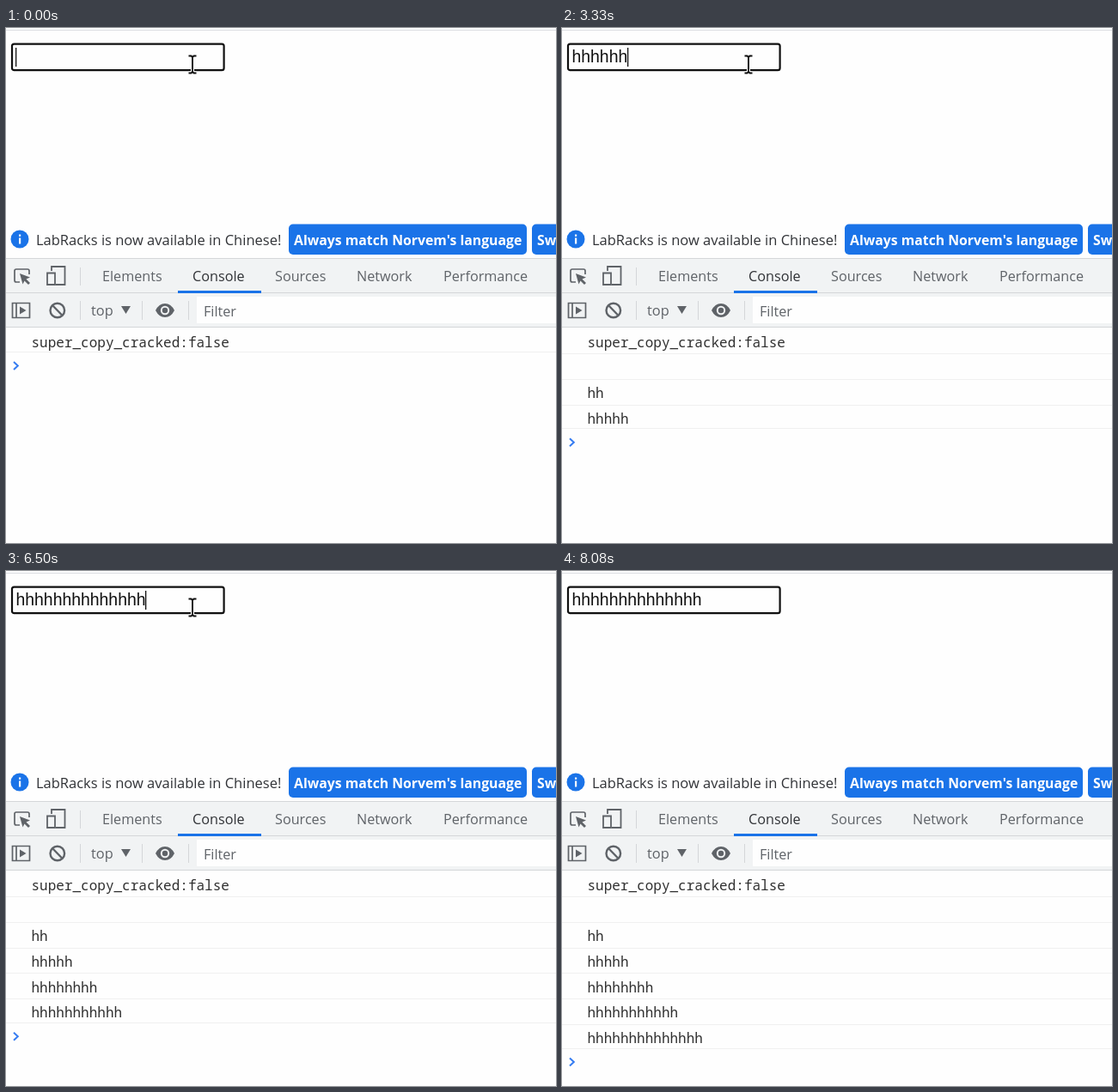
Recreate the animation shown at these times as an HTML page with a canvas. Size 640x600 px, loop 8580 ms.

```html
<!DOCTYPE html>
<html lang="en">
<head>
<meta charset="utf-8">
<title>Console typing</title>
<style>
html, body { margin: 0; width: 100%; height: 100%; overflow: hidden; background: #fefefe; }
canvas { display: block; width: 640px; height: 600px; }
</style>
</head>
<body>
<canvas id="stage"></canvas>
<script>
const LOOP = 8580;
const PAGE = '#fefefe', BAR = '#f1f3f4', EDGE = '#d4d6d9', ICON = '#5f6368';
const BLUE = '#1a73e8', HOVER = '#3b86ea';
const UI = '"Open Sans", "Noto Sans", sans-serif';
const MONO = '"Noto Sans Mono", "DejaVu Sans Mono", monospace';
const INPUT = '"Liberation Sans", Arial, sans-serif';

// Moments at which a letter is typed, and at which its text reaches the console.
const keys = [1000, 1580, 2080, 2500, 2920, 3330, 3830, 4170, 4580, 5000, 5420, 5830, 6080, 6500];
const logs = [[500, 0], [1830, 2], [3000, 5], [4330, 8], [5580, 11], [6580, 14]];
// Pointer stops after it leaves the input: [time, x, y].
const stops = [[7420, 262, 110], [7500, 350, 250], [7580, 428, 473], [7670, 484, 578]];

const canvas = document.getElementById('stage');
const ctx = canvas.getContext('2d');
const scale = window.devicePixelRatio || 1;
canvas.width = 640 * scale;
canvas.height = 600 * scale;

function rect(x, y, w, h, color) {
  ctx.fillStyle = color;
  ctx.fillRect(x, y, w, h);
}

function text(str, x, y, font, color) {
  ctx.font = font;
  ctx.fillStyle = color;
  ctx.fillText(str, x, y);
}

function stroke(path, color, width) {
  ctx.strokeStyle = color;
  ctx.lineWidth = width;
  ctx.stroke(new Path2D(path));
}

function fill(path, color) {
  ctx.fillStyle = color;
  ctx.fill(new Path2D(path));
}

function disc(x, y, r, color) {
  ctx.beginPath();
  ctx.arc(x, y, r, 0, Math.PI * 2);
  ctx.fillStyle = color;
  ctx.fill();
}

function roundBox(x, y, w, h, r) {
  ctx.beginPath();
  ctx.roundRect(x, y, w, h, r);
}

function drawInput(t) {
  rect(0, 2, 640, 1, '#dadce0');
  roundBox(7, 18.6, 246.6, 30.6, 2.5);
  ctx.strokeStyle = '#101010';
  ctx.lineWidth = 2.2;
  ctx.stroke();

  const typed = keys.filter(k => k <= t);
  const value = 'h'.repeat(typed.length);
  text(value, 11.5, 40, '19.4px ' + INPUT, '#101010');

  const idle = Math.max(0, t - (typed.at(-1) || 0) - 80);
  if (Math.floor(idle / 500) % 2 === 0) {
    rect(Math.round(11.3 + ctx.measureText(value).width), 23, 1.3, 22, '#101010');
  }
}

function drawButton(x, w, label, color) {
  roundBox(x, 228.5, w, 35.5, 5);
  ctx.fillStyle = color;
  ctx.fill();
  text(label, x + 6, 253, '700 15.8px ' + UI, '#fefefe');
}

function drawInfobar(t) {
  disc(16, 246, 10.5, BLUE);
  rect(15, 244.5, 2.2, 7, '#fff');
  rect(15, 240.5, 2.2, 2.3, '#fff');
  text('LabRacks is now available in Chinese!', 35, 253, '16.5px ' + UI, '#303236');
  const hover = t >= 7500 && t < 7670;
  drawButton(329, 277, "Always match Norvem's language", hover ? HOVER : BLUE);
  drawButton(612, 60, 'Switch', BLUE);
}

function drawTabs() {
  rect(0, 268, 640, 81, BAR);
  for (const y of [268, 308, 348]) rect(0, y, 640, 1, EDGE);

  const tabs = [['Elements', 112], ['Console', 217], ['Sources', 313], ['Network', 408], ['Performance', 509]];
  for (const [name, x] of tabs) {
    text(name, x, 295, '16.2px ' + UI, name === 'Console' ? '#303236' : ICON);
  }
  rect(200, 306, 97, 3, BLUE);

  // Inspect and device icons
  stroke('M16 296H12Q10 296 10 294V283Q10 281 12 281H25Q27 281 27 283V287', ICON, 1.7);
  fill('M16 286L28 290.5L23.5 292.5L28 297L26 299L21.5 294.5L19.5 298.5Z', ICON);
  stroke('M53 283V278H68.5V299H58', ICON, 1.8);
  stroke('M48 285.5H57V299H48Z', ICON, 1.8);
  rect(86, 279, 1, 21, EDGE);
}

function drawFilterRow() {
  stroke('M7.5 320.5H27.5V337.5H7.5Z M12 320V338', ICON, 1.7);
  fill('M16 324.5L23.5 329L16 333.5Z', ICON);

  stroke('M51.5 329A8.3 8.3 0 1 0 68.1 329A8.3 8.3 0 1 0 51.5 329 M54 323L65.6 335', ICON, 2.4);
  for (const x of [86, 158, 212]) rect(x, 318, 1, 22, EDGE);

  text('top', 99, 335, '16.4px ' + UI, ICON);
  fill('M134 324H145L139.5 333Z', ICON);

  fill('M174 329Q178 321 185 321Q192 321 196 329Q192 337 185 337Q178 337 174 329Z', ICON);
  disc(185, 329, 5.2, BAR);
  disc(185, 329, 3.2, ICON);

  rect(222, 313, 418, 31, PAGE);
  text('Filter', 230, 336, '16.2px ' + UI, ICON);
}

function drawConsole(t) {
  const pitch = 29.75;
  const lines = ['super_copy_cracked:false'];
  for (const [time, count] of logs) if (time <= t) lines.push('h'.repeat(count));

  lines.forEach((line, i) => {
    const y = 371.5 + i * pitch;
    text(line, 29.5, Math.round(y), '500 16px ' + MONO, '#303030');
    const gap = i === lines.length - 1 ? 5.5 : 7.5;
    rect(0, Math.round(y + gap), 640, 1, '#f0f0f0');
  });

  const y = 393.4 + (lines.length - 1) * pitch;
  stroke(`M9 ${y - 4.5}L13.8 ${y}L9 ${y + 4.5}`, '#367cf1', 2);
}

function drawPointer(t) {
  if (t < stops[0][0]) {
    const beam = 'M212.5 32.5H215.5L217 34L218.5 32.5H221.5 M217 34V51 M212.5 52.5H215.5L217 51L218.5 52.5H221.5';
    stroke(beam, '#fff', 4);
    stroke(beam, '#101010', 1.9);
    return;
  }
  if (t >= 7830) return;
  const [, x, y] = stops.findLast(s => s[0] <= t);
  ctx.save();
  ctx.translate(x, y);
  const arrow = 'M.5 .5V22.5L5.5 18L9 26.5L12.5 25L9 17H15.5Z';
  fill(arrow, '#fff');
  stroke(arrow, '#202020', 1.3);
  ctx.restore();
}

function draw(now) {
  const t = now % LOOP;
  ctx.setTransform(scale, 0, 0, scale, 0, 0);
  rect(0, 0, 640, 600, PAGE);
  drawInput(t);
  drawInfobar(t);
  drawTabs();
  drawFilterRow();
  drawConsole(t);
  drawPointer(t);
}

const start = performance.now();
function tick() {
  draw(performance.now() - start);
  requestAnimationFrame(tick);
}
tick();
</script>
</body>
</html>
```
